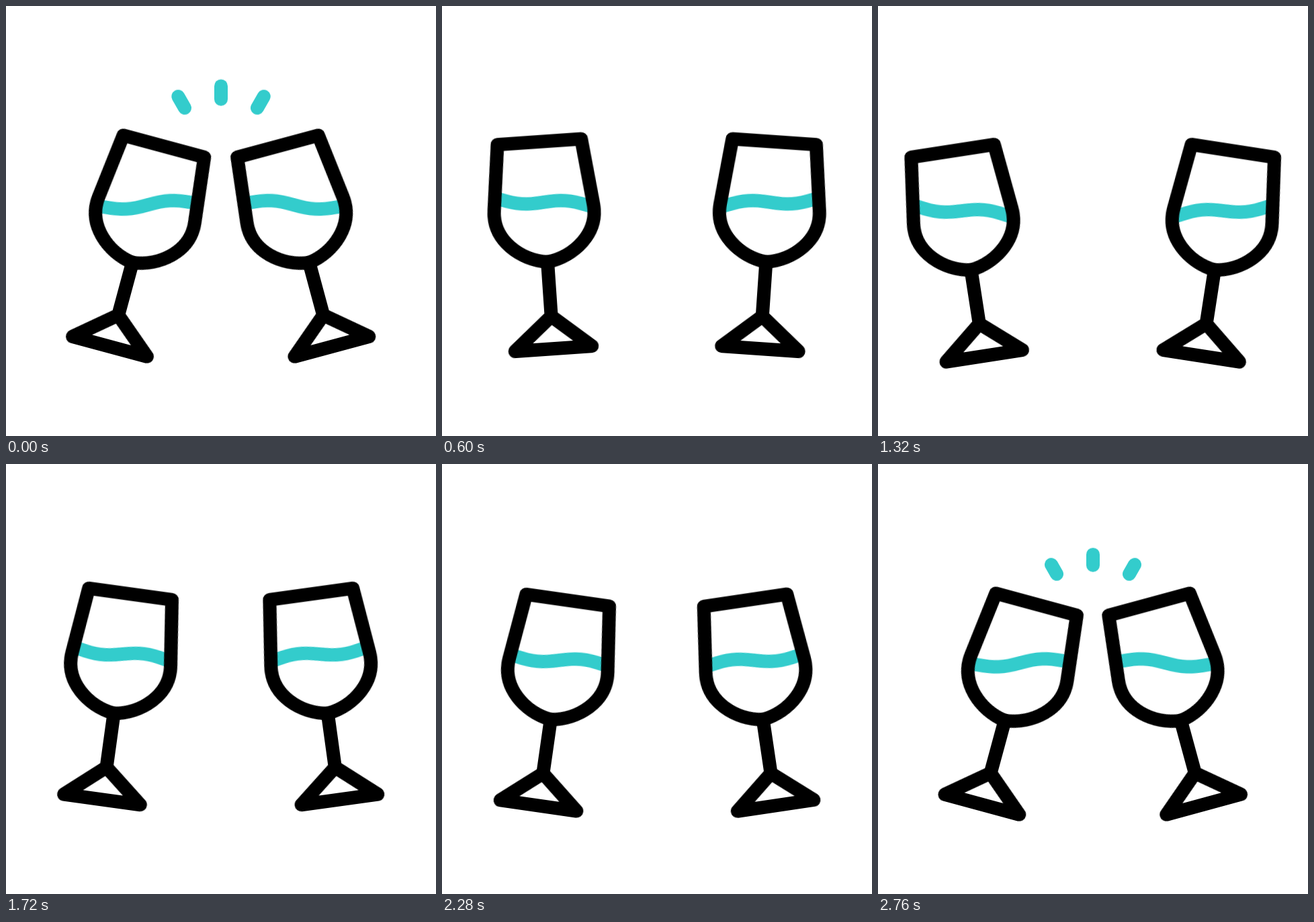
An HTML page that plays this animation: 640x640 px, repeating every 2800 ms.

```html
<!DOCTYPE html>
<html lang="en">
<head>
<meta charset="utf-8">
<title>Cheers</title>
<style>
  html, body { margin: 0; width: 100%; height: 100%; overflow: hidden; background: #fff; }
  svg { display: block; width: 100%; height: 100%; }
  path { fill: none; stroke: #000; stroke-width: 20; stroke-linecap: round; stroke-linejoin: round; }
  .teal { stroke: #33cccc; }
  #wave { stroke-linecap: butt; }

  .glass, .liquid { animation: 2.8s infinite; }
  .glass { animation-name: toast; }
  .liquid { animation-name: slosh; }

  /* Lean of each glass and its liquid at the clink */
  .left { --lean: 16.85deg; --dip: -6.4deg; }
  .right { --lean: 18.2deg; --dip: -4.2deg; }

  /* Lean back, lift, get ready, clink, bounce off */
  @keyframes toast {
    0% { transform: translate(194.6px, 358.2px) rotate(15.1deg); animation-timing-function: cubic-bezier(.4, 0, .68, .58); }
    21.43% { transform: translate(155.5px, 356.4px) rotate(-3.9deg); animation-timing-function: cubic-bezier(.25, .65, .6, 1); }
    42.86% { transform: translate(132.9px, 370px) rotate(-9.8deg); animation-timing-function: cubic-bezier(.5, 0, .6, 1); }
    65.71% { transform: translate(166.7px, 344.8px) rotate(9.4deg); animation-timing-function: cubic-bezier(.25, 0, .3, 1); }
    78.57% { transform: translate(154.4px, 355.5px) rotate(5.9deg); animation-timing-function: cubic-bezier(.33, 0, .67, 1); }
    88.57% { transform: translate(207.8px, 358.1px) rotate(var(--lean)); animation-timing-function: cubic-bezier(.33, 0, .67, 1); }
    100% { transform: translate(194.6px, 358.2px) rotate(15.1deg); }
  }

  /* Liquid tilt relative to its glass */
  @keyframes slosh {
    0% { transform: rotate(-18.1deg); animation-timing-function: cubic-bezier(.4, 0, .68, .58); }
    21.43% { transform: rotate(7.7deg); animation-timing-function: cubic-bezier(.25, .65, .6, 1); }
    42.86% { transform: rotate(15deg); animation-timing-function: cubic-bezier(.5, 0, .6, 1); }
    65.71% { transform: rotate(-2deg); animation-timing-function: cubic-bezier(.25, 0, .3, 1); }
    78.57% { transform: rotate(-1.8deg); animation-timing-function: cubic-bezier(.33, 0, .67, 1); }
    88.57% { transform: rotate(var(--dip)); animation-timing-function: cubic-bezier(.33, 0, .67, 1); }
    100% { transform: rotate(-18.1deg); }
  }

  /* Sparks fly up while growing, then shrink into their tips */
  .sparks, .sparks path { animation: 2.8s cubic-bezier(.33, 0, .67, 1) -.24s infinite; }
  .sparks { animation-name: rise; }
  .sparks path { animation-name: flash; }

  @keyframes rise {
    0% { transform: translateY(82px); }
    14.29%, 100% { transform: none; }
  }
  @keyframes flash {
    0% { stroke-dasharray: 4px 40px; stroke-dashoffset: 0px; opacity: 1; }
    14.29% { stroke-dasharray: 28px 40px; stroke-dashoffset: 0px; opacity: 1; }
    22.85% { stroke-dasharray: 0px 40px; stroke-dashoffset: -28px; opacity: 1; }
    22.86%, 100% { stroke-dasharray: 0px 40px; stroke-dashoffset: -28px; opacity: 0; }
  }
</style>
</head>
<body>
<svg viewBox="0 0 640 640">
  <defs>
    <path id="wave" class="teal" d="M-73-1.8L-65 0C-40 6-25 6 0 0S40-6 65 0L73 1.8"/>
    <g id="outline">
      <path d="M-62.5-154.7L-74-57C-79.2-13-40 19 0 24.5C40 19 79.2-13 74-57L62.5-154.7Z"/>
      <path d="M0 24.5V105.5L-57.4 154H57.4L0 105.5"/>
    </g>
  </defs>
  <g class="sparks">
    <path class="teal" d="M266 123l-14-24.5"/>
    <path class="teal" d="M320 110v-28"/>
    <path class="teal" d="M374 123l14-24.5"/>
  </g>
  <g class="left">
    <g class="glass">
      <g transform="translate(0 -64.5)"><use class="liquid" href="#wave"/></g>
      <use href="#outline"/>
    </g>
  </g>
  <g class="right" transform="translate(639.4) scale(-1 1)">
    <g class="glass">
      <g transform="translate(0 -64.5)"><use class="liquid" href="#wave"/></g>
      <use href="#outline"/>
    </g>
  </g>
</svg>
</body>
</html>
```
